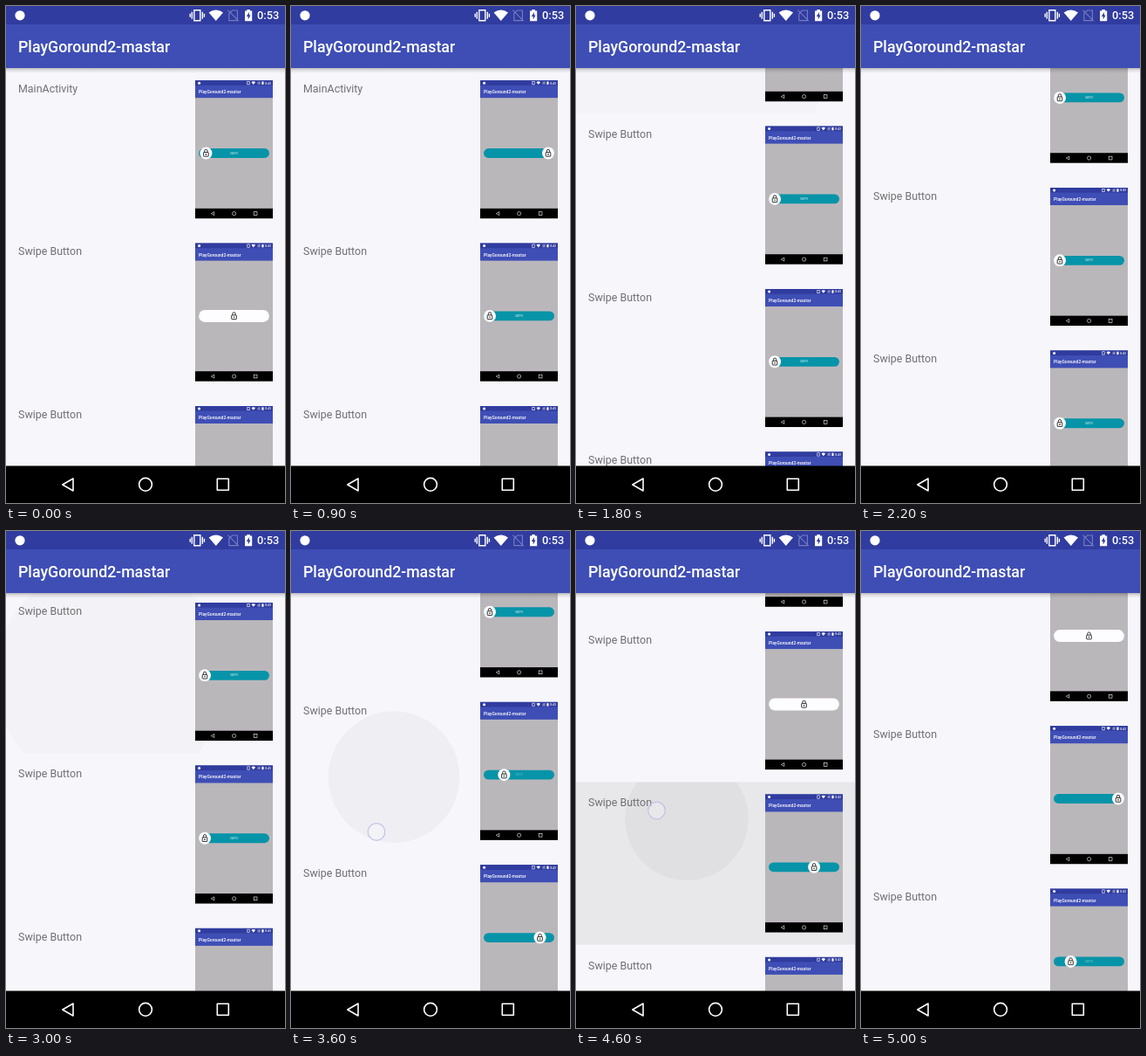
An HTML page for the animation above (5100 ms loop, 320 by 569 pixels).

```html
<!DOCTYPE html>
<html lang="en">
<head>
<meta charset="utf-8">
<title>Swipe list</title>
<style>
html, body { margin: 0; width: 100%; height: 100%; overflow: hidden; background: #f7f6fa; }
svg { display: block; width: 100%; height: 100%; }
text { font-family: Roboto, sans-serif; }
</style>
</head>
<body>
<svg id="stage" viewBox="0 0 320 569" preserveAspectRatio="none">
  <defs>
    <clipPath id="listClip"><rect y="71" width="320" height="456"/></clipPath>
    <clipPath id="rowClip"><rect width="320" height="186.4"/></clipPath>
    <linearGradient id="shade" x2="0" y2="1">
      <stop stop-color="#000" stop-opacity=".26"/>
      <stop offset=".4" stop-color="#000" stop-opacity=".1"/>
      <stop offset="1" stop-color="#000" stop-opacity="0"/>
    </linearGradient>
    <g id="lock">
      <path d="M-1.7 -.9V-2.5A1.7 1.7 0 0 1 1.7 -2.5V-.9" fill="none" stroke="#222" stroke-width=".9"/>
      <rect x="-2.8" y="-1" width="5.6" height="4.7" rx=".5" fill="none" stroke="#222" stroke-width=".9"/>
      <circle cy="1.4" r=".8" fill="#222"/>
    </g>
    <g id="shot">
      <rect width="89" height="158" fill="#bab7bb"/>
      <rect width="89" height="20" fill="#3f4eb5"/>
      <rect width="89" height="5.6" fill="#303c9f"/>
      <rect y="146.6" width="89" height="11.4" fill="#000"/>
      <text x="4" y="15" font-size="4.94" font-weight="500" fill="#fff">PlayGoround2-mastar</text>
      <g fill="#fff">
        <circle cx="4.6" cy="3" r="1.5"/>
        <rect x="59.8" y="1.3" width="2.4" height="3.4" fill="none" stroke="#fff" stroke-width=".6"/>
        <path d="M64.5 2Q66.8 .3 69.1 2L66.8 4.8Z"/>
        <path d="M71.5 4.6V2L73 1.2H74.6V4.6Z" fill="#8088c6"/>
        <rect x="76.4" y="1.3" width="2.1" height="3.4"/>
        <text x="80.2" y="4.4" font-size="3.4" font-weight="500">0:43</text>
      </g>
      <g fill="none" stroke="#fff" stroke-width=".6">
        <path d="M21.8 150.4V154.4L18.3 152.4Z"/>
        <circle cx="44.6" cy="152.4" r="2.1"/>
        <rect x="67.2" y="150.5" width="3.8" height="3.8"/>
      </g>
    </g>
  </defs>
  <rect width="320" height="569" fill="#f7f6fa"/>
  <g clip-path="url(#listClip)">
    <g id="press" clip-path="url(#rowClip)">
      <rect id="tint" width="320" height="186.4"/>
      <circle id="ripple"/>
    </g>
    <g id="list"></g>
    <rect y="71" width="320" height="6" fill="url(#shade)"/>
  </g>
  <rect width="320" height="71" fill="#3f4eb5"/>
  <rect width="320" height="21" fill="#303c9f"/>
  <text x="14" y="53" font-size="17.8" font-weight="500" fill="#fff">PlayGoround2-mastar</text>
  <g fill="#fff">
    <circle cx="16" cy="10.8" r="5.6"/>
    <path d="M215.8 4.8H222.8V16.8H215.8ZM213.3 6.8V14.8M225.3 6.8V14.8M211.2 8.8V12.8M227.4 8.8V12.8" fill="none" stroke="#fff" stroke-width="1.4"/>
    <path d="M232.6 7.4Q240.8 1.6 249 7.4L240.8 17Z"/>
    <path d="M255.8 16.6V8.6L259.6 5H265.4V16.6ZM254.4 4.6L266.8 17.2" fill="none" stroke="#737bc1" stroke-width="1.2"/>
    <path d="M274 5.5H276.4V4.1H279.8V5.5H282.2V17.2H274Z"/>
    <path d="M278.9 7L275.8 12H277.7V15.6L280.6 10.6H278.9Z" fill="#303c9f"/>
    <text x="288" y="15.4" font-size="12.8" font-weight="500">0:53</text>
  </g>
  <rect y="526.5" width="320" height="43" fill="#000"/>
  <g fill="none" stroke="#fff" stroke-width="1.6" stroke-linejoin="round">
    <path d="M77 541V555L64.8 548Z"/>
    <circle cx="160" cy="547.8" r="7.4"/>
    <rect x="242.3" y="541.3" width="13" height="13"/>
  </g>
  <circle id="touch" r="9.8" fill="#fff" fill-opacity=".25" stroke="#bcbde9" stroke-opacity=".85" stroke-width="1.3"/>
</svg>
<script>
const LOOP = 5100, PITCH = 186.4, BAR_Y = 83.3;
const $ = id => document.getElementById(id);
const clamp = v => Math.max(0, Math.min(1, v));
const mix = (a, b, u) => a + (b - a) * u;
const set = (el, attrs) => { for (const k in attrs) el.setAttribute(k, attrs[k]); };

// Scroll legs: start, end, distance at end, power (positive eases in, negative eases out)
const legs = [
  [1280, 1600, 130, 2.47],
  [1600, 2400, 439.5, -3.3],
  [2560, 2800, 505, 1.6],
  [2800, 3350, 589.4, -2.5],
  [3350, 3650, 650, 1.6],
  [3650, 4360, 902.1, -1.49],
  [4600, 4780, 940, 1.5],
  [4780, 5100, 980.5, -5]
];

function scrollAt(t) {
  let pos = 0;
  for (const [from, to, end, p] of legs) {
    if (t < from) break;
    const u = clamp((t - from) / (to - from));
    pos = mix(pos, end, p > 0 ? u ** p : 1 - (1 - u) ** -p);
  }
  return pos;
}

// Finger contacts with the row ripple they cause
const presses = [
  { down: 1280, up: 1600, x: 105.5, y: 401, row: 1, cx: 125, cy: 139, tint: 0, ink: .036 },
  { down: 2560, up: 2800, x: 100, y: 400, row: 3, cx: 120, cy: 100, tint: 0, ink: .03 },
  { down: 3350, up: 3650, x: 98, y: 390, row: 4, cx: 118, cy: 100, tint: 0, ink: .03 },
  { down: 4365, up: 4780, x: 92.5, y: 320, row: 6, cx: 127, cy: 42, tint: .063, ink: .034 }
];

// Moment at which the knob of each row begins to slide
const slideStart = [200, -1400, 9000, 9000, 3430, 3000, 4130, 4870];
const SLIDE = 700, DONE = 1100, RESET = 2300;

const rows = slideStart.map((start, i) => {
  const g = document.createElementNS("http://www.w3.org/2000/svg", "g");
  g.innerHTML = `
    <text x="14" y="28" font-size="12.45" fill="#706f73">${i ? "Swipe Button" : "MainActivity"}</text>
    <g transform="translate(217 14.2)">
      <use href="#shot"/>
      <rect x="4" y="${BAR_Y - 5.4}" width="81" height="10.8" rx="5.4" fill="#0794a8"/>
      <text class="label" x="44.6" y="${BAR_Y + 1.1}" font-size="3.1" text-anchor="middle" fill="#d5eef1">SWIPE</text>
      <rect class="knob" y="${BAR_Y - 7}" height="14" rx="7" fill="#fdfcfe"/>
      <use class="icon" href="#lock"/>
    </g>`;
  $("list").append(g);
  const part = name => g.querySelector("." + name);
  return { g, start, home: i ? 11 : 12.4, label: part("label"), knob: part("knob"), icon: part("icon") };
});

function drawRow(row, i, t, scroll) {
  const age = t - row.start;
  const active = age > 0 && age < RESET;
  const x = active ? mix(row.home, 78, clamp(age / SLIDE)) : row.home;
  const open = active ? clamp((age - DONE) / 150) : 0;
  const left = mix(x - 7, 4, open), right = mix(x + 7, 85, open);
  set(row.g, { transform: `translate(0 ${71 + i * PITCH - scroll})` });
  set(row.knob, { x: left, width: right - left });
  set(row.icon, { transform: `translate(${(left + right) / 2} ${BAR_Y})` });
  set(row.label, { opacity: clamp(1 - (x - row.home) / 26) });
}

function drawPress(t, scroll) {
  const p = presses.find(q => t >= q.down && t < q.up + 350);
  const touching = p && t < p.up;
  set($("press"), { visibility: p ? "visible" : "hidden" });
  set($("touch"), { visibility: touching ? "visible" : "hidden" });
  if (!p) return;
  const age = t - p.down;
  const fade = 1 - clamp((age - 260) / 380);
  set($("press"), { transform: `translate(0 ${71 + p.row * PITCH - scroll})` });
  set($("tint"), { opacity: p.tint * clamp(age / 120) * fade });
  set($("ripple"), { cx: p.cx, cy: p.cy, r: age * .3, opacity: p.ink * fade });
  set($("touch"), { cx: p.x, cy: p.y - scroll + scrollAt(p.down) });
}

function draw(t) {
  const scroll = scrollAt(t);
  rows.forEach((row, i) => drawRow(row, i, t, scroll));
  drawPress(t, scroll);
}

const began = performance.now();
function tick() {
  draw((performance.now() - began) % LOOP);
  requestAnimationFrame(tick);
}
tick();
</script>
</body>
</html>
```
